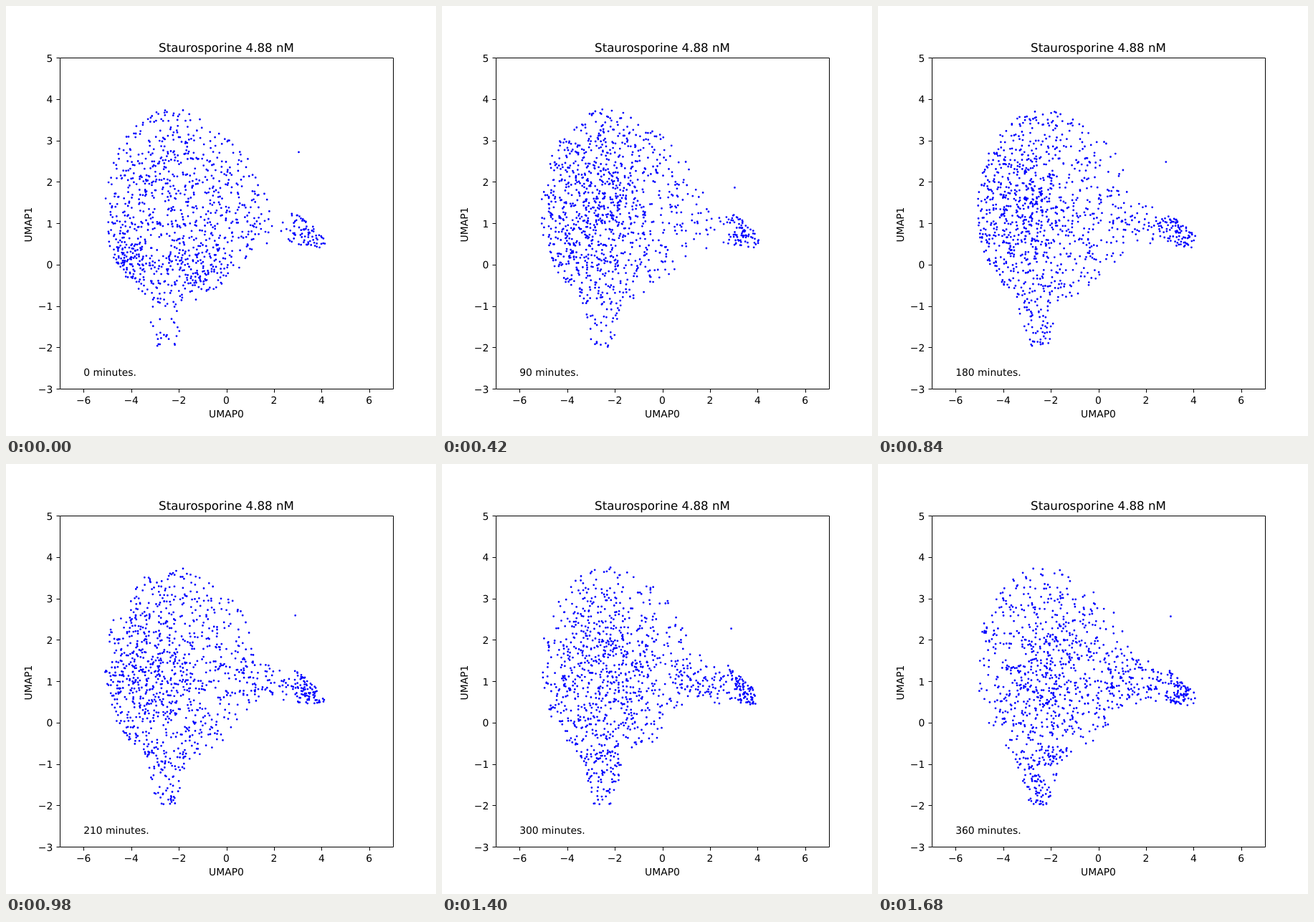
An HTML page for the animation above (1.82 s loop, 600x600 px).

```html
<!DOCTYPE html>
<html lang="en">
<head>
<meta charset="utf-8">
<title>UMAP scatter over time</title>
<style>
  html, body { margin: 0; width: 100%; height: 100%; overflow: hidden; background: #fff; }
  svg { display: block; width: 600px; height: 600px; }
  text {
    font: 13.89px "DejaVu Sans", sans-serif;
    text-rendering: geometricPrecision;
    text-anchor: middle;
  }
  #title { font-size: 16.67px; }
  #clock { text-anchor: start; }
  .ylab { text-anchor: end; }
  #dots { fill: none; stroke: #00f; stroke-width: 2.8; stroke-linecap: round; }
  #axes { fill: none; stroke: #000; stroke-width: 1; }
</style>
</head>
<body>
<svg viewBox="0 0 600 600">
  <path id="dots"/>
  <path id="axes"/>
  <g id="labels"></g>
  <text id="title" x="307.5" y="64">Staurosporine 4.88 nM</text>
  <text x="307.5" y="574">UMAP0</text>
  <text transform="translate(36 305) rotate(-90)">UMAP1</text>
  <text id="clock" x="108.2" y="516"></text>
</svg>
<script>
const STEP_MS = 140, STEPS = 13;
const byId = id => document.getElementById(id);

function drawAxes() {
  let d = 'M75.5 72.5H540.5V534.5H75.5Z', labels = '';
  const name = n => n < 0 ? '\u2212' + -n : n;
  for (let n = -6; n <= 6; n += 2) {
    const x = 75 + 465 / 14 * (n + 7);
    d += `M${Math.round(x) + .5} 535v4.5`;
    labels += `<text x="${x}" y="555">${name(n)}</text>`;
  }
  for (let n = -3; n <= 5; n++) {
    const y = 534 - 57.75 * (n + 3);
    d += `M75 ${Math.round(y) + .5}h-4.5`;
    labels += `<text class="ylab" x="65.3" y="${Math.round(y + 5.5)}">${name(n)}</text>`;
  }
  byId('axes').setAttribute('d', d);
  byId('labels').innerHTML = labels;
}

function seeded(seed) {
  return () => {
    seed = (seed + 0x6D2B79F5) | 0;
    let t = Math.imul(seed ^ seed >>> 15, 1 | seed);
    t ^= t + Math.imul(t ^ t >>> 7, 61 | t);
    return ((t ^ t >>> 14) >>> 0) / 4294967296;
  };
}

// Lopsided ellipse: round on the left, tapering to the right
function inBody(x, y) {
  const dx = x < 235 ? (235 - x) / 97 : (x - 235) / 138;
  const dy = y < 285 ? (285 - y) / 142 : (y - 285) / 135;
  const power = x < 235 ? 2 : 1.5;
  return dx ** power + dy ** power < 1;
}

function cloud(step) {
  const u = step / (STEPS - 1);
  const early = Math.max(0, 1 - 6 * u);
  const rnd = seeded(step * 977 + 41);
  const spread = () => 2 * rnd() - 1;
  const peaked = () => rnd() + rnd() - 1;
  let d = '';
  const dot = (x, y) => d += `M${x.toFixed(1)} ${y.toFixed(1)}h0`;
  const repeat = (count, draw) => {
    for (let n = Math.round(count); n > 0; n--) draw();
  };
  const body = (count, pick) => repeat(count, () => {
    let p;
    do p = pick(); while (!inBody(...p));
    dot(...p);
  });
  const bell = (x, y, sx, sy) => () => {
    const r = Math.sqrt(-2 * Math.log(1 - rnd())), a = 2 * Math.PI * rnd();
    return [x + sx * r * Math.cos(a), y + sy * r * Math.sin(a)];
  };

  // Even fill that thins out beyond a soft right edge
  const edge = 302 + 40 * early;
  body(680 - 200 * u, () => {
    let x;
    do x = 138 + 235 * rnd(); while (rnd() > Math.exp((edge - x) / 28));
    return [x, 143 + 277 * rnd()];
  });

  // Main clump swings left and back; two early clumps fade away
  const swing = Math.sin(Math.PI * u);
  body(100 + 220 * Math.min(1, 4 * u), bell(242 - 42 * swing, 275 + 20 * u, 38, 52));
  body(110 * (1 - u) ** 3, bell(168, 350, 20, 24));
  body(90 * early, bell(265, 365, 25, 18));

  // Bridge, tail and foot fill up with time
  repeat(15 + 100 * u, () => {
    const v = rnd();
    dot(320 + 75 * v, 292 + 18 * v + (58 - 34 * v) * peaked());
  });
  repeat(75 + 20 * u, () => {
    const v = (peaked() + 1) / 2;
    dot(392 + 54 * v, 303 + 28 * v + (28 - 20 * v) * spread());
  });
  repeat(30 + 70 * u, () => {
    const v = rnd();
    dot(224 + (36 - 23 * v) * spread(), 398 + 78 * v);
  });
  dot(405 + 6 * spread(), 222 + 35 * spread());
  return d;
}

drawAxes();
const clouds = Array.from({ length: STEPS }, (_, i) => cloud(i));
const start = performance.now();
let shown = -1;

function show() {
  const step = Math.floor(Math.max(0, performance.now() - start) / STEP_MS) % STEPS;
  if (step !== shown) {
    shown = step;
    byId('dots').setAttribute('d', clouds[step]);
    byId('clock').textContent = `${step * 30} minutes.`;
  }
  requestAnimationFrame(show);
}
show();
</script>
</body>
</html>
```
